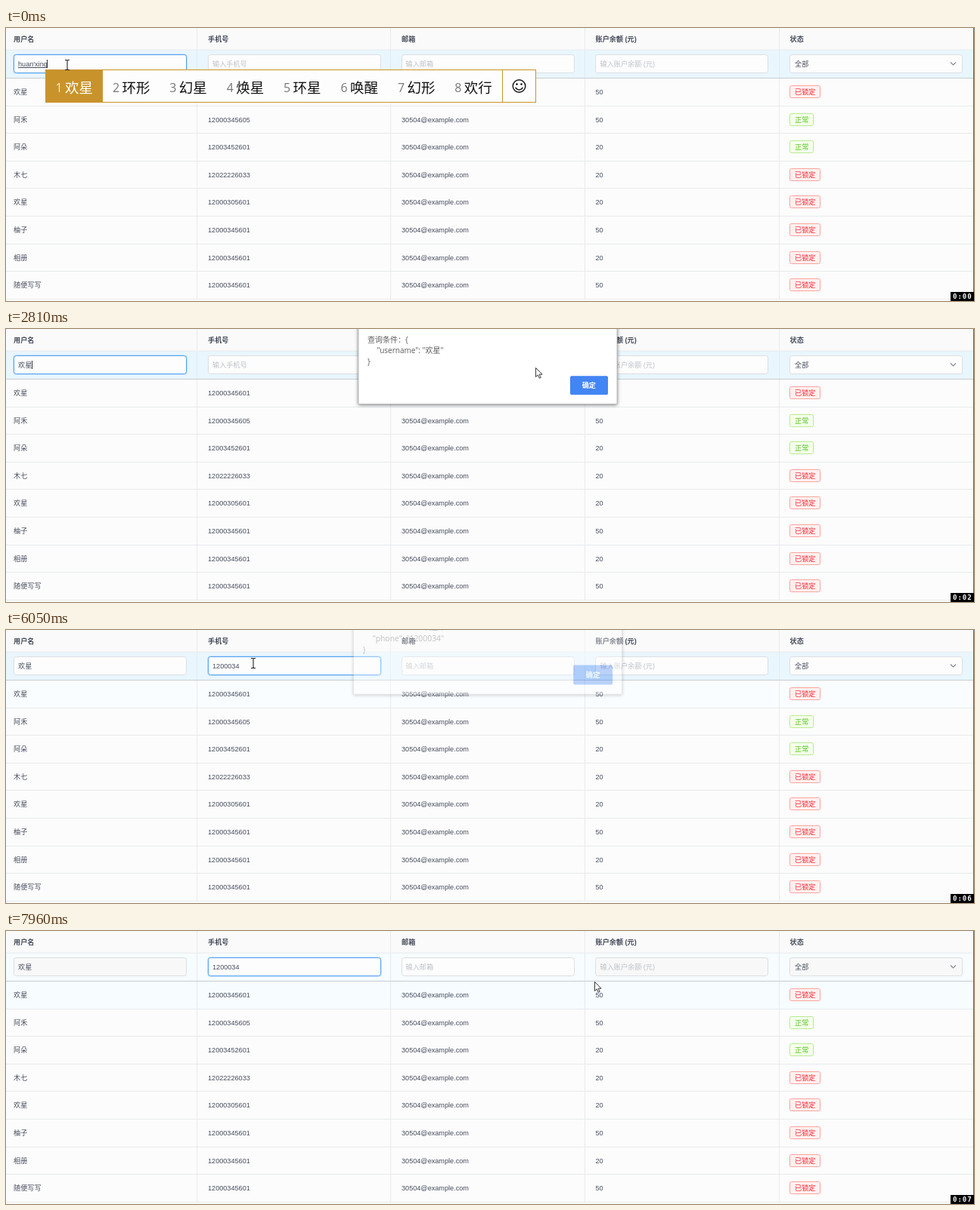
Write an HTML page that moves like this. It is 1280 px wide and 362 px high and loops after 8000 ms.

```html
<!DOCTYPE html>
<html lang="zh-CN">
<head>
<meta charset="utf-8">
<title>表格筛选</title>
<style>
  html, body { margin: 0; width: 100%; height: 100%; overflow: hidden; background: #fcfcfc; }
  svg { display: block; }
  text { font: 9.15px "Liberation Sans", "Noto Sans CJK SC", "Noto Sans CJK", sans-serif; fill: #464d5e; white-space: pre; }
  .head { font-weight: bold; fill: #464c5b; }
  .hint { fill: #bcc0c8; }
  .ime text { font: 18.5px "Noto Sans CJK SC", "Noto Sans CJK", sans-serif; fill: #111; }
  .ime .num { font: 16px "Open Sans", sans-serif; fill: #777; }
  .ime .on { fill: #fff; }
  .ime .num.on { fill: #f8ead0; }
  .dialog text { font: 10px "Open Sans", "Noto Sans CJK SC", "Noto Sans CJK", sans-serif; fill: #5c5c5c; }
  .dialog .ok { font-size: 9.2px; font-weight: bold; fill: #fff; }
  .dialog .panel { filter: drop-shadow(0 1px 2px rgba(0, 0, 0, .5)); }
  #clock { font: bold 9px "DejaVu Sans Mono", monospace; letter-spacing: 1px; fill: #fff; }
</style>
</head>
<body>
<svg id="stage" width="1280" height="362" viewBox="0 0 1280 362"></svg>
<script>
const LOOP = 8000, NAME = '欢星', PHONE = '1200034', DIGIT = 5.09;
const KEY_TIMES = [4220, 4530, 4680, 4890, 5140, 5350, 5500];
const COLS = [10, 267, 523, 779.5, 1036.5];
const ROW_H = 36.6, ROWS_TOP = 66.5;
const HEADS = ['用户名', '手机号', '邮箱', '账户余额 (元)', '状态'];
const ROWS = [
  [NAME, '12000345601', 50, 0], ['阿禾', '12000345605', 50, 1],
  ['阿朵', '12003452601', 20, 1], ['木七', '12022226033', 20, 0],
  [NAME, '12000305601', 20, 0], ['柚子', '12000345601', 50, 0],
  ['相册', '12000345601', 20, 0], ['随便写写', '12000345601', 50, 0]
];
const CANDIDATES = ['欢星', '环形', '幻星', '焕星', '环星', '唤醒', '幻形', '欢行'];

const text = (x, y, s, extra = '') => `<text x="${x}" y="${y}" ${extra}>${s}</text>`;
const rect = (x, y, w, h, fill, extra = '') =>
  `<rect x="${x}" y="${y}" width="${w}" height="${h}" fill="${fill}" ${extra}/>`;
const line = (x1, y1, x2, y2, color, extra = '') =>
  `<path d="M${x1} ${y1}L${x2} ${y2}" stroke="${color}" ${extra}/>`;

function tag(y, normal) {
  const [label, w, color, border, fill] = normal
    ? ['正常', 31, '#52c41a', '#b7eb8f', '#f6ffed']
    : ['已锁定', 40, '#f5222d', '#ffa39e', '#fff1f0'];
  return rect(1036.5, Math.round(y - 8.5) + .5, w, 16, fill, `stroke="${border}" rx="2"`)
    + text(1043, y + 3.5, label, `style="fill:${color}"`);
}

function field(column, i) {
  const x = Math.floor(column) + .5;
  const box = (grow, extra) =>
    rect(x - grow, 35.5 - grow, 228 + 2 * grow, 24 + 2 * grow, 'none', `rx="${3 + grow}" ${extra}`);
  return rect(x, 35.5, 228, 24, '#fdfdfd', `id="box${i}" rx="3" stroke="#dcdee2"`)
    + box(1, `id="glow${i}" stroke="#2d8cf0" stroke-opacity=".2" opacity="0"`)
    + box(0, `id="blue${i}" stroke="#57a3f3" opacity="0"`);
}

function table() {
  let s = rect(0, 0, 1280, 29, '#fafafa') + rect(0, 29, 1280, 37, '#e9f6fe', 'id="filter"')
    + rect(0, 67, 1280, 36, '#fcfcfc', 'id="first"');
  for (const x of [252.5, 508.5, 765.5, 1022.5]) s += line(x, 0, x, 359, '#e8eaec');
  s += line(0, 29, 1280, 29, '#e8eaec') + line(0, 66.5, 1280, 66.5, '#c8ccd0');
  HEADS.forEach((h, i) => s += text(COLS[i], 17.5, h, 'class="head"'));
  COLS.forEach((x, i) => s += field(x, i));
  s += text(16, 50.5, '', 'id="name"') + line(16, 52.5, 55, 52.5, '#464d5e', 'id="underline"')
    + text(273, 50.5, '', 'id="phone"')
    + text(528.5, 50.5, '输入邮箱', 'class="hint"') + text(785.5, 50.5, '输入账户余额 (元)', 'class="hint"')
    + text(1043, 50.5, '全部')
    + '<path d="M1249 45.5l3.5 3.5 3.5-3.5" fill="none" stroke="#808695" stroke-width="1.1"/>'
    + rect(0, 42, 1, 11, '#333', 'id="caret"');
  ROWS.forEach(([name, phone, money, normal], i) => {
    const y = 84.5 + i * ROW_H, bottom = Math.round(ROWS_TOP + (i + 1) * ROW_H - .5) + .5;
    [name, phone, '30504@example.com', money].forEach((v, c) => s += text(COLS[c], y + 3.5, v));
    s += tag(y, normal) + line(0, bottom, 1280, bottom, '#e8eaec');
  });
  return s + rect(0, 360, 1280, 2, '#fff') + line(1279.5, 0, 1279.5, 362, '#606266');
}

function ime() {
  let s = rect(52.5, 55.5, 648, 43, '#fdfdfd', 'stroke="#c9932b"') + rect(52, 55, 76, 44, '#c9932b')
    + line(656.5, 55, 656.5, 99, '#c9932b');
  CANDIDATES.forEach((word, i) => {
    const x = 65.5 + i * 75.4, on = i ? '' : 'on';
    s += text(x, 85, i + 1, `class="num ${on}"`) + text(x + 12.5, 85.5, word, `class="${on}"`);
  });
  return s + `<g fill="none" stroke="#111" stroke-width="1.4"><circle cx="678.5" cy="77" r="8.3"/>
    <path d="M673.5 79q5 6 10 0"/></g><circle cx="675.5" cy="74.5" r="1.2"/><circle cx="681.5" cy="74.5" r="1.2"/>`;
}

function dialog(id, lines, bottom) {
  let s = rect(466, -40, 342, bottom + 39.5, '#fff', 'class="panel" rx="1.5" stroke="#b4b4b4" stroke-width=".8"');
  lines.forEach((l, i) => s += text(l[0] === '"' ? 490.5 : 478, 17.5 + i * 14.6, l));
  s += rect(746, bottom - 37.7, 50, 25, '#4285f4', 'rx="2"') + text(761.7, bottom - 21.6, '确定', 'class="ok"');
  return `<g id="${id}" class="dialog">${s}</g>`;
}

stage.innerHTML = table()
  + `<g id="ime" class="ime">${ime()}</g>`
  + dialog('dialogA', ['查询条件：{', `"username": "${NAME}"`, '}'], 100)
  + dialog('dialogB', ['查询条件：{', `"username": "${NAME}",`, `"phone": "${PHONE}"`, '}'], 115)
  + `<path id="beam" d="M-3-6.5h2.2l.8.7.8-.7H3M0-6V6M-3 6.5h2.2l.8-.7.8.7H3" fill="none" stroke="#222" stroke-width="1.1"/>
     <path id="arrow" d="M.5.5v12l2.8-2.6 2 4.4 1.9-.9-2-4.2H9z" fill="#fff" stroke="#222" stroke-width=".9"/>`
  + rect(1249, 350, 31, 12, '#000') + text(1252, 358.5, '', 'id="clock"');

const $ = id => document.getElementById(id);
const ramp = (t, start, length) => Math.min(1, Math.max(0, (t - start) / length));
const show = (id, on) => $(id).style.display = on ? '' : 'none';
const mix = (a, b, p) => `rgb(${a.map((v, i) => v + (b[i] - v) * p)})`;
const within = (t, a, b) => t >= a && t < b;

// time, x, y
const PATH = [
  [0, 81, 49], [1540, 81, 49], [1660, 180, 32], [1840, 430, 22], [2010, 640, 46], [2190, 735, 68],
  [2300, 735, 68], [2340, 743, 71], [2520, 743, 71], [2600, 758, 75], [2690, 752, 73], [2810, 701, 51],
  [3000, 520, 48], [3270, 342, 44], [3400, 328, 43], [3900, 328, 43], [3980, 327, 44], [6480, 327, 44],
  [6500, 423, 6], [6620, 640, 50], [6740, 800, 96], [6900, 800, 96], [7060, 776, 92], [7450, 774, 90],
  [7690, 748, 50], [7780, 757, 55], [7960, 778, 67], [LOOP, 778, 67]
];

function pointer(t) {
  const i = PATH.findIndex(p => p[0] > t), [t0, x0, y0] = PATH[i - 1], [t1, x1, y1] = PATH[i];
  const p = (t - t0) / (t1 - t0);
  return [x0 + (x1 - x0) * p, y0 + (y1 - y0) * p];
}

function openDialog(id, t, start, end) {
  const rest = (1 - ramp(t, start, 230)) ** 3;
  show(id, within(t, start, end));
  $(id).setAttribute('opacity', 1 - rest);
  $(id).setAttribute('transform', `translate(${637 * -.06 * rest} ${-52 * rest}) scale(${1 + .06 * rest})`);
}

function draw(t) {
  const composing = t < 60;
  show('ime', composing);
  show('underline', composing);
  $('name').textContent = composing ? "huan'xing" : NAME;

  const typed = KEY_TIMES.filter(k => k <= t).length;
  $('phone').textContent = typed ? PHONE.slice(0, typed) : '输入手机号';
  $('phone').setAttribute('class', typed ? '' : 'hint');

  const onPhone = t >= 3520;
  $('caret').setAttribute('x', onPhone ? Math.round(272.6 + typed * DIGIT) : composing ? 54 : 34);
  show('caret', t < 560 || within(t, 2780, 3270) || within(t, 3520, 3980)
    || within(t, 4220, 5970) || within(t, 7460, 7960));

  const left = 1 - ramp(t, 3520, 200);
  $('blue0').setAttribute('opacity', left);
  $('glow0').setAttribute('opacity', left);
  $('blue1').setAttribute('opacity', ramp(t, 3350, 100));
  $('glow1').setAttribute('opacity', ramp(t, 3520, 200));
  $('blue2').setAttribute('opacity', ramp(t, 7580, 100) - ramp(t, 7700, 100));

  const leave = ramp(t, 7540, 150);
  $('filter').setAttribute('fill', mix([233, 246, 254], [246, 252, 255], leave));
  $('first').setAttribute('fill', t < 3000 ? '#fcfcfc' : mix([250, 253, 255], [246, 252, 255], leave));
  for (const i of [0, 3, 4]) $('box' + i).setAttribute('fill', mix([253, 253, 253], [248, 248, 248], leave));

  openDialog('dialogA', t, 990, 2860);
  openDialog('dialogB', t, 6020, 7530);

  const [x, y] = pointer(t);
  const beam = t < 1660 || within(t, 3000, 6560) || within(t, 7600, 7740);
  show('beam', beam);
  show('arrow', !beam);
  $(beam ? 'beam' : 'arrow').setAttribute('transform', `translate(${x} ${y})`);

  $('clock').textContent = '0:0' + Math.min(7, Math.floor((t + 50) / 1000));
}

const begin = performance.now();
function tick() {
  draw((performance.now() - begin) % LOOP);
  requestAnimationFrame(tick);
}
tick();
</script>
</body>
</html>
```
